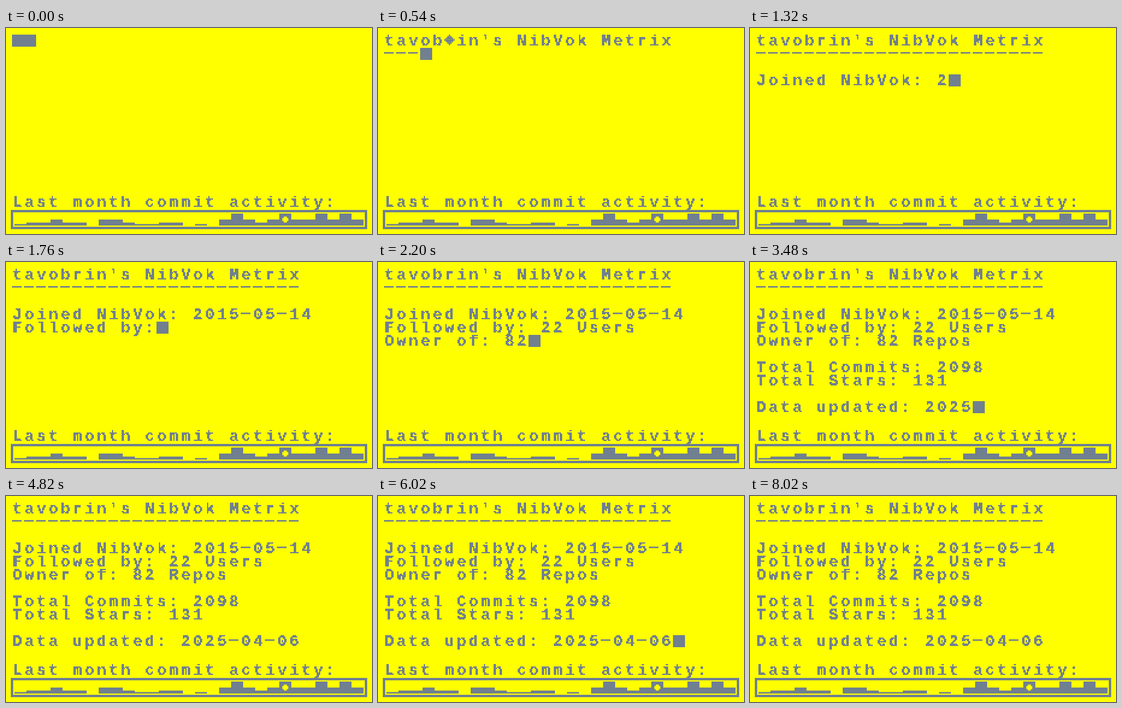
An HTML page with a canvas that plays this animation: 608x342 px, repeating every 8.42 s.

```html
<!DOCTYPE html>
<html lang="en">
<head>
<meta charset="utf-8">
<title>Commit activity terminal</title>
<style>
html, body { margin: 0; width: 100%; height: 100%; overflow: hidden; background: #ff0; }
canvas { display: block; }
</style>
</head>
<body>
<canvas id="screen" width="608" height="342"></canvas>
<script>
const INK = '#708090', PAPER = '#ff0';
const CELL = 20, LINE = 22, DOT = 2.5, LEFT = 10, TOP = 11;
const LOOP = 8420, KEY = 20, BLINK = 400;

const title = "tavobrin's NibVok Metrix";
const text = [
  title,
  '-'.repeat(title.length),
  '',
  'Joined NibVok: 2015-05-14',
  'Followed by: 22 Users',
  'Owner of: 82 Repos',
  '',
  'Total Commits: 2098',
  'Total Stars: 131',
  '',
  'Data updated: 2025-04-06'
].join('\n');
const typedAt = (text.length - 1) * KEY;
const activity = [1, 2, 2, 4, 2, 2, 0, 4, 4, 2, 1, 1, 2, 2, 0,
  1, 0, 4, 8, 4, 2, 4, 8, 4, 4, 8, 4, 8, 4];

const ctx = document.getElementById('screen').getContext('2d');
ctx.imageSmoothingEnabled = false;

function rect(x, y, w, h, color = INK) {
  ctx.fillStyle = color;
  ctx.fillRect(x, y, w, h);
}

// Letters are set at half size without grey edges, then doubled.
const glyphs = {};
function glyph(ch) {
  if (glyphs[ch]) return glyphs[ch];
  const tile = document.createElement('canvas');
  tile.width = 10;
  tile.height = 13;
  const g = tile.getContext('2d', { willReadFrequently: true });
  g.font = 'bold 13px "Liberation Mono", monospace';
  g.textAlign = 'center';
  g.fillStyle = INK;
  g.fillText(ch, 4.5, 9);
  const img = g.getImageData(0, 0, 10, 13);
  for (let i = 0; i < img.data.length; i += 4) {
    const on = img.data[i + 3] > 105;
    img.data.set([0x70, 0x80, 0x90, on ? 255 : 0], i);
  }
  g.putImageData(img, 0, 0);
  return glyphs[ch] = tile;
}

function diamond(x, y) {
  for (let i = 0; i < 7; i++) {
    const w = 7 - 2 * Math.abs(3 - i);
    rect(x + (7 - w) / 2 * DOT, y + i * DOT, w * DOT, DOT);
  }
}

function put(ch, x, y) {
  if (ch === ' ') return;
  if (ch === '-') rect(x, y + 7, 16, 2.5);
  else if (ch === '♦') diamond(x, y);
  else if (ch === '█') rect(x, y, CELL, CELL);
  else ctx.drawImage(glyph(ch), x, y, 20, 26);
}

function drawChart() {
  [...'Last month commit activity:'].forEach((ch, i) => put(ch, LEFT + i * CELL, 279));
  rect(8, 302, 592, 32);
  rect(12, 306, 584, 24, PAPER);
  activity.forEach((n, i) => rect(14 + i * CELL, 328 - n * DOT, CELL, n * DOT));
  rect(461.5, 313, 5, 10, PAPER);
  rect(459, 315.5, 10, 5, PAPER);
}

// Brief wrong characters while the line is being typed.
function shown(i, t) {
  if (i === 0 && t < KEY) return '█';
  if (i === 5 && t >= 500 && t < 900) return '♦';
  return text[i];
}

function draw(t) {
  rect(0, 0, 608, 342, PAPER);
  const count = Math.min(text.length, Math.floor(t / KEY) + 1);
  let x = LEFT, y = TOP;
  for (let i = 0; i < count; i++) {
    if (text[i] === '\n') {
      x = LEFT;
      y += LINE;
    } else {
      put(shown(i, t), x, y);
      x += CELL;
    }
  }
  const blinks = Math.floor((t - typedAt - KEY) / BLINK);
  if (blinks < 0 || blinks % 2 === 0) put('█', x, y);
  drawChart();
}

const start = performance.now();
function tick() {
  draw((performance.now() - start) % LOOP);
  requestAnimationFrame(tick);
}
tick();
</script>
</body>
</html>
```
